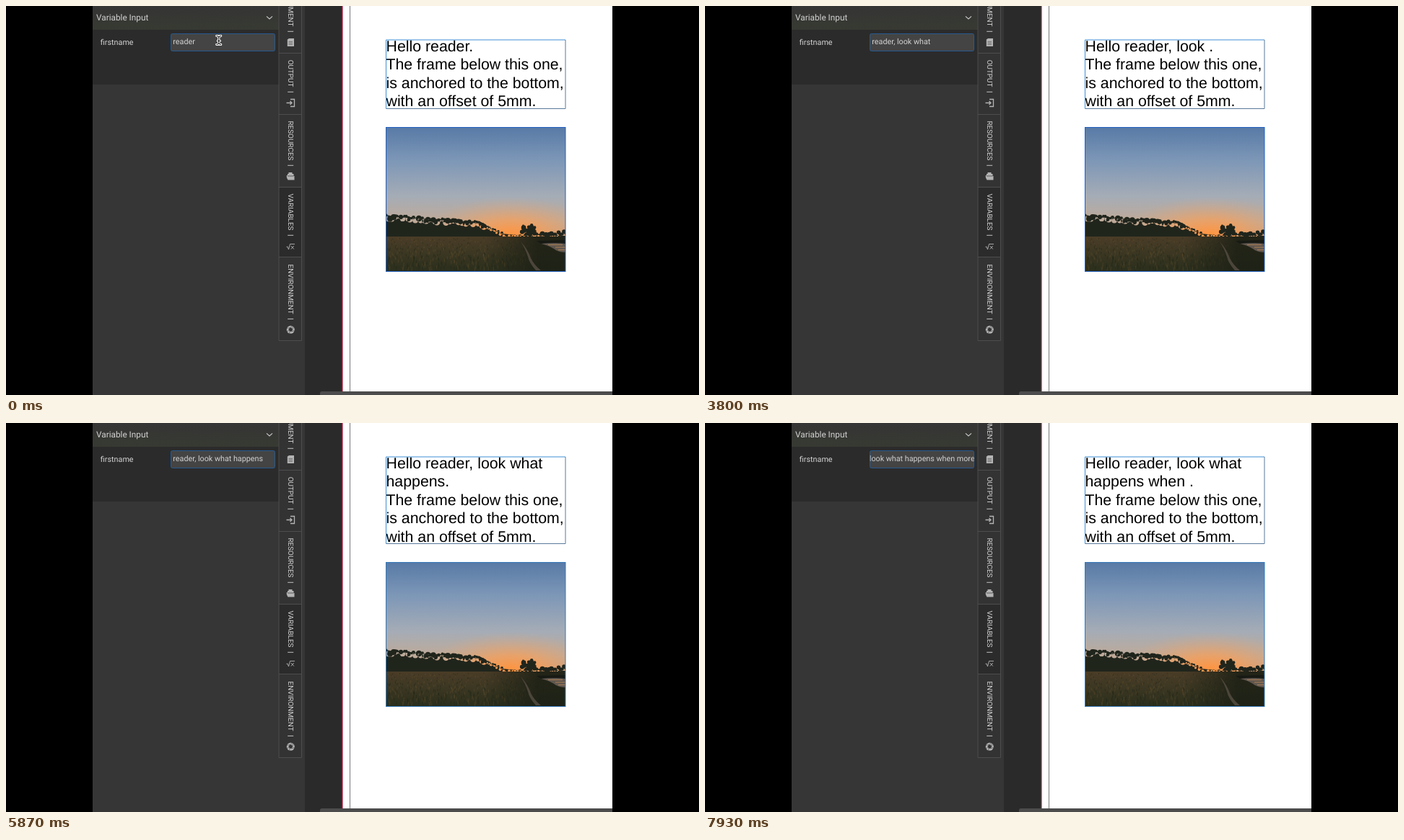
Recreate the animation shown at these times as an HTML page. Size 960 by 540 pixels, loop 8000 ms.

```html
<!DOCTYPE html>
<html lang="en">
<head>
<meta charset="utf-8">
<title>Variable input</title>
<style>
  html, body { margin: 0; width: 100%; height: 100%; overflow: hidden; background: #000; }
  svg { display: block; width: 100vw; height: 100vh; }
  text { white-space: pre; text-rendering: geometricPrecision; }
  .ui { font-family: Roboto, sans-serif; fill: #d2d2d2; }
  .page { font: 21.3px "Liberation Sans", Arial, sans-serif; fill: #000; }
</style>
</head>
<body>
<svg viewBox="0 0 960 540">
  <defs>
    <linearGradient id="head" x2="0" y2="1">
      <stop offset="0" stop-color="#353535"/><stop offset="1" stop-color="#373a32"/>
    </linearGradient>
    <linearGradient id="sky" x2="0" y2="1">
      <stop offset="0" stop-color="#587aa6"/><stop offset=".3" stop-color="#7d97b7"/>
      <stop offset=".62" stop-color="#a5acb6"/><stop offset=".85" stop-color="#bfaa98"/>
      <stop offset="1" stop-color="#c79c78"/>
    </linearGradient>
    <radialGradient id="glow">
      <stop offset="0" stop-color="#ff9440"/><stop offset=".4" stop-color="#f3a05e" stop-opacity=".75"/>
      <stop offset="1" stop-color="#d8a884" stop-opacity="0"/>
    </radialGradient>
    <linearGradient id="field" x2="0" y2="1">
      <stop offset="0" stop-color="#4a3c27"/><stop offset=".4" stop-color="#3e3823"/>
      <stop offset="1" stop-color="#2a2e1c"/>
    </linearGradient>
    <linearGradient id="shade">
      <stop offset=".55" stop-color="#1c2015" stop-opacity="0"/><stop offset=".85" stop-color="#1c2015" stop-opacity=".85"/>
    </linearGradient>
    <clipPath id="photoClip"><rect width="248" height="200"/></clipPath>
    <clipPath id="inputClip"><rect x="228.5" y="39" width="144.3" height="23"/></clipPath>
  </defs>

  <rect width="960" height="540"/>
  <rect x="120" width="294" height="540" fill="#363636"/>
  <rect x="120" width="258" height="33" fill="url(#head)"/>
  <rect x="120" y="33" width="258" height="76" fill="#2b2b2b"/>
  <rect x="414" width="52" height="540" fill="#2a2a2a"/>
  <rect x="466" width="374" height="535" fill="#fff"/>
  <rect x="465.7" width="1.1" height="535" fill="#e0486c"/>
  <rect x="476" width="1" height="535" fill="#777"/>
  <rect x="414" y="535" width="426" height="5" fill="#2a2a2a"/>
  <path d="M840 535V540H435V537.5Q435 535 437.5 535Z" fill="#4c4c4c"/>

  <text class="ui" x="125" y="19.6" font-size="11.8">Variable Input</text>
  <path d="M361 14.4L365 18L369 14.4" fill="none" stroke="#ccc" stroke-width="1.1"/>
  <text class="ui" x="130.8" y="53.7" font-size="10.8">firstname</text>
  <rect x="228.5" y="38.5" width="144" height="24" rx="2" fill="#444" stroke="#265a8e"/>
  <g clip-path="url(#inputClip)">
    <text id="input" class="ui" y="53" font-size="10.75"></text>
    <rect id="caret" y="44" width="1" height="12" fill="#e8e8e8"/>
  </g>
  <g id="cursor" fill="none" stroke-linecap="round">
    <path id="beam" d="M291.8 41.5Q294.8 41.5 294.8 43.5Q294.8 41.5 297.8 41.5M294.8 43V52M291.8 53.5Q294.8 53.5 294.8 51.5Q294.8 53.5 297.8 53.5M293.3 48.5H296.3" stroke="#fff" stroke-width="2.8"/>
    <use href="#beam"/>
    <path d="M291.8 41.5Q294.8 41.5 294.8 43.5Q294.8 41.5 297.8 41.5M294.8 43V52M291.8 53.5Q294.8 53.5 294.8 51.5Q294.8 53.5 297.8 53.5M293.3 48.5H296.3" stroke="#111"/>
  </g>

  <rect x="378" width="32" height="464" fill="#333"/>
  <rect x="378" y="251" width="32" height="98" fill="#2b2b2b"/>
  <path d="M378 0V464.5H409.5V0M378 65.5H410M378 150.5H410M378 251.5H410M378 348.5H410" fill="none" stroke="#4d4d4d"/>
  <g id="tabs"></g>
  <g fill="#b4b4b4">
    <path d="M389.8 46.5L392 45H399V56H389.8Z"/>
    <path d="M391.5 49.5H397M391.5 51.5H397M391.5 53.5H397" stroke="#555" stroke-width=".7"/>
    <path d="M394 129.5H399.5V139.5H394M388.5 134.5H396M393.5 132L396 134.5L393.5 137" fill="none" stroke="#b4b4b4" stroke-width="1.3"/>
    <path d="M391.5 231H396.5V233H398.5V236H399.5V241.5H390.5L388.8 238V235H390V233H391.5Z"/>
    <path d="M390 236H398.5" stroke="#333" stroke-width=".7"/>
    <path d="M388.5 334.5L390 334L391.5 338L393.5 330.5H400M394.8 333L398.8 337.5M398.8 333L394.8 337.5" fill="none" stroke="#b4b4b4" stroke-width=".9"/>
    <circle cx="394.3" cy="449.3" r="5.5"/>
    <path d="M392.9 446.8H395.7L397.1 449.3L395.7 451.8H392.9L391.5 449.3Z" fill="#333"/>
    <path d="M392.9 446.8L396.5 444.4M397.1 449.3L397.3 445.3M395.7 451.8L399.5 450.5M392.9 451.8L393 454.7M391.5 449.3L389.6 452.5M392.9 446.8L389.2 447.3" stroke="#333" stroke-width=".6"/>
  </g>

  <g id="doc" class="page"></g>
  <path id="frame" fill="none" stroke="#3f8fd4"/>
  <path id="frameEnd" fill="none" stroke="#59799a"/>

  <g id="photo">
    <g clip-path="url(#photoClip)">
      <rect width="248" height="155" fill="url(#sky)"/>
      <ellipse cx="172" cy="149" rx="120" ry="52" fill="url(#glow)"/>
      <path id="trees" fill="#20251c"/>
      <rect y="152" width="248" height="48" fill="url(#field)"/>
      <path id="grass" fill="none" stroke="#69532f" stroke-width=".7" opacity=".55"/>
      <path id="blades" fill="none" stroke="#1e2415" stroke-width=".8" opacity=".6"/>
      <rect y="152" width="248" height="48" fill="url(#shade)"/>
      <path d="M208 158L248 157V163H216Z" fill="#171a14"/>
      <path d="M214 162Q232 160 248 162V174Q238 174 232 169Q224 164 214 162Z" fill="#61574f"/>
      <path d="M224 163.5H244M234 167H248M238 170.5H248" stroke="#c08a57" stroke-width="1.1" opacity=".75"/>
      <path d="M186 159Q196 170 200 182Q205 192 214 199L207 199Q198 189 196 180Q193 170 186 159Z" fill="#5a5146" opacity=".75"/>
    </g>
    <rect id="edge" x="-.5" y=".5" width="248.5" height="200" fill="none"/>
  </g>
</svg>
<script>
const LOOP = 8000;
const PHRASE = 'reader, look what happens when more';
const INPUT_X = 231.3;

// time, characters typed, caret shown
const KEYS = [
  [0, 6, 0], [400, 6, 1], [530, 7, 1], [670, 8, 1], [930, 9, 1], [1130, 10, 1],
  [1270, 11, 1], [1470, 12, 1], [1730, 12, 0], [2470, 13, 1], [3000, 13, 0],
  [3130, 14, 1], [3330, 15, 1], [3470, 16, 1], [3600, 17, 1], [3670, 18, 1],
  [3800, 18, 0], [4470, 18, 1], [4670, 19, 1], [4800, 20, 1], [4930, 21, 1],
  [5070, 22, 1], [5130, 23, 1], [5330, 24, 1], [5470, 25, 1], [5800, 25, 0],
  [6330, 26, 1], [6470, 27, 1], [6670, 28, 1], [6800, 29, 1], [6930, 30, 1],
  [7000, 31, 1], [7130, 31, 0], [7670, 32, 0], [7800, 34, 0], [7930, 35, 0]
];
// time, characters that have reached the page
const UPDATES = [[0, 6], [1930, 12], [2930, 13], [4130, 18], [5870, 25], [7400, 31]];
const BODY = ['The frame below this one,', 'is anchored to the bottom,', 'with an offset of 5mm.'];

const $ = id => document.getElementById(id);
const at = (list, t) => list.findLast(row => row[0] <= t);

function random(seed) {
  return () => (seed = (seed * 16807) % 2147483647) / 2147483647;
}

function drawTabs() {
  const tabs = [['DOCUMENT', 28.5], ['OUTPUT', 112.5], ['RESOURCES', 214.5], ['VARIABLES', 311.5], ['ENVIRONMENT', 427.6]];
  $('tabs').innerHTML = tabs.map(([name, y]) =>
    `<text class="ui" font-size="9.95" text-anchor="end" transform="translate(390.7 ${y}) rotate(90)">${name}</text>
     <rect x="390.2" y="${y + 6.3}" width="8" height="1" fill="#c0c0c0"/>`).join('');
}

function drawLandscape() {
  const rnd = random(41);
  const blob = (x, y, r) => `M${x - r} ${y}a${r} ${r} 0 1 0 ${2 * r} 0a${r} ${r} 0 1 0 ${-2 * r} 0`;
  const treeTop = x => x < 130 ? 119 + x * .08 : Math.min(149, 130 + (x - 130) * .5);
  let trees = 'M0 155V124L60 128L130 134L160 148L190 151L210 150L248 151V160H0Z';
  for (let x = 0; x < 186; x += 2.5) {
    const r = 1.5 + rnd() * (x < 140 ? 3 : 1);
    trees += blob(x, treeTop(x) + r + rnd() * 4, r);
  }
  for (let i = 0; i < 34; i++) {
    const a = rnd() * 6.28, d = Math.sqrt(rnd());
    trees += blob(196 + Math.cos(a) * d * 11, 144 + Math.sin(a) * d * 9, 1.4 + rnd() * 2);
  }
  for (let x = 206; x < 250; x += 2.5) trees += blob(x, 148 + rnd() * 4 - (x > 236 ? 3 : 0), 1.6 + rnd() * 2);
  $('trees').setAttribute('d', trees);

  const strokes = (count, width) => {
    let d = '';
    for (let i = 0; i < count; i++) {
      const depth = rnd();
      d += `M${rnd() * width} ${155 + depth * 45}l${rnd() * 2 - 1} ${-1.5 - depth * 4}`;
    }
    return d;
  };
  $('grass').setAttribute('d', strokes(230, 200));
  $('blades').setAttribute('d', strokes(230, 220));
}

function drawInput(t) {
  const [, count, caret] = at(KEYS, t);
  const value = PHRASE.slice(0, count);
  const input = $('input');
  input.textContent = value;
  const width = input.getComputedTextLength();
  const limit = value.endsWith(' ') ? 372 : 373.6;
  const x = Math.min(INPUT_X, limit - width);
  input.setAttribute('x', x);
  $('caret').setAttribute('x', Math.min(371.5, Math.round(x + width)));
  $('caret').setAttribute('visibility', caret ? 'visible' : 'hidden');
  $('cursor').setAttribute('visibility', t < 400 ? 'visible' : 'hidden');
}

function drawPage(t) {
  const hello = `Hello ${PHRASE.slice(0, at(UPDATES, t)[1])}.`;
  const wrapped = hello.includes('happens');
  const lines = [...(wrapped ? hello.split(/ (?=happens)/) : [hello]), ...BODY];
  $('doc').innerHTML = lines.map((line, i) => `<text x="526.5" y="${62.8 + i * 25.56}">${line}</text>`).join('');

  const bottom = wrapped ? 167.5 : 142.5;
  $('frame').setAttribute('d', `M526.5 ${bottom}V47H775`);
  $('frameEnd').setAttribute('d', `M775 47V${bottom}H526.5`);
  $('photo').setAttribute('transform', `translate(527 ${wrapped ? 193 : 168})`);
  $('edge').setAttribute('stroke', wrapped ? '#3478b8' : '#2360c0');
}

function render(t) {
  drawInput(t);
  drawPage(t);
}

drawTabs();
drawLandscape();
const start = performance.now();
function tick() {
  render((performance.now() - start) % LOOP);
  requestAnimationFrame(tick);
}
tick();
</script>
</body>
</html>
```
